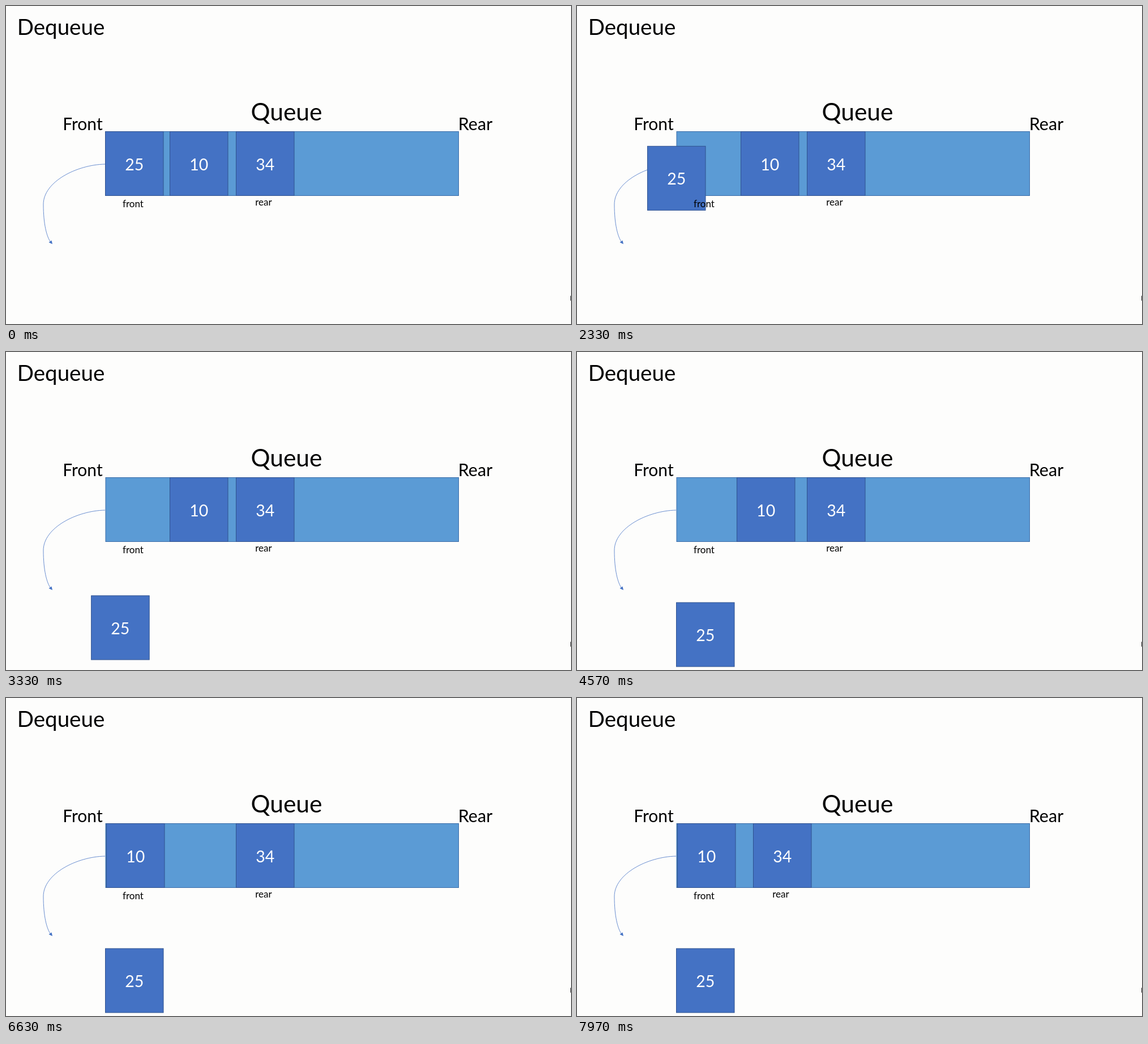
Recreate the animation shown at these times as an HTML page. Size 998 px wide and 561 px high, loop 8000 ms.

```html
<!DOCTYPE html>
<html lang="en">
<head>
<meta charset="utf-8">
<title>Dequeue</title>
<style>
  html, body { margin: 0; width: 100%; height: 100%; overflow: hidden; background: #fdfdfc; }
  svg { display: block; width: 998px; height: 561px; }
  text { font-family: Lato, "Open Sans", sans-serif; text-anchor: middle; }
  .block rect { fill: #4472c4; stroke: #2f528f; }
  .block text { fill: #fff; font-size: 28.5px; }
</style>
</head>
<body>
<svg viewBox="0 0 998 561">
  <rect width="998" height="561" fill="#fdfdfc"/>
  <text x="97" y="51" font-size="38.5">Dequeue</text>
  <text x="495.5" y="202" font-size="42.5">Queue</text>
  <text x="135.5" y="219" font-size="30">Front</text>
  <text x="829" y="219" font-size="30.5">Rear</text>
  <path d="M999 511.5H997.5V519.5H999" fill="none" stroke="#222"/>

  <rect x="176" y="221.5" width="623.5" height="113" fill="#5b9bd5" stroke="#3a6ca8"/>
  <path d="M175 279C125 280 66 310 66 350C66 385 72 407 78.5 416" fill="none" stroke="#4472c4" stroke-width=".8"/>
  <path d="M75.5 417L80.5 413.5L82 420Z" fill="#4472c4"/>

  <g id="first" class="block"></g>
  <g id="second" class="block"></g>
  <g id="third" class="block"></g>
  <text x="224.5" y="355" font-size="17">front</text>
  <text id="rear" x="455" y="352" font-size="17">rear</text>
  <path id="exit" d="M0 0C-50 25 -148 70 -148 118C-148 160 -70 185 0 220.5" fill="none"/>
</svg>
<script>
  const LOOP = 8000;
  const TOP = 221.5;
  const byId = id => document.getElementById(id);

  function makeBlock(id, value, x) {
    const group = byId(id);
    group.innerHTML = `<rect width="102.5" height="113"/><text x="51.2" y="68">${value}</text>`;
    return (dx, dy = 0) => group.setAttribute("transform", `translate(${x + dx} ${TOP + dy})`);
  }

  const moveFirst = makeBlock("first", 25, 175.5);
  const moveSecond = makeBlock("second", 10, 289.5);
  const moveThird = makeBlock("third", 34, 406.5);
  const rear = byId("rear");
  const exit = byId("exit");
  const exitLength = exit.getTotalLength();

  function ease(time, start, duration) {
    const u = Math.min(1, Math.max(0, (time - start) / duration));
    return u * u * u * (10 + u * (6 * u - 15));
  }

  function render(time) {
    const point = exit.getPointAtLength(exitLength * ease(time, 1744, 2028));
    moveFirst(point.x, point.y);
    moveSecond(-112 * ease(time, 4181, 1890));

    const shift = -112.8 * ease(time, 6640, 1890);
    moveThird(shift);
    rear.setAttribute("transform", `translate(${shift} 0)`);
  }

  const origin = performance.now();
  function tick() {
    render((performance.now() - origin) % LOOP);
    requestAnimationFrame(tick);
  }
  tick();
</script>
</body>
</html>
```
